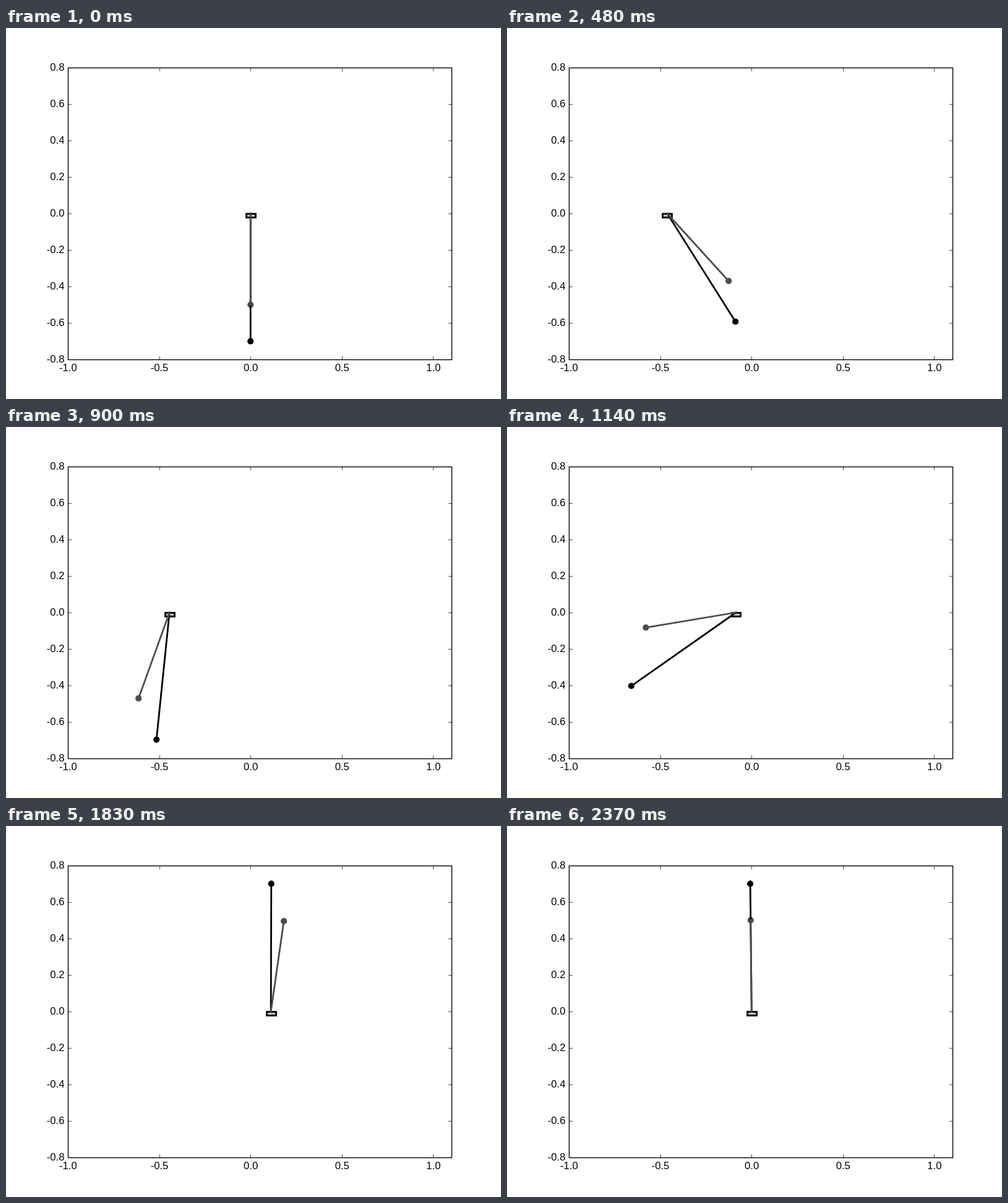
An HTML page with a canvas for the animation above (2400 ms loop, 800 px wide and 600 px high).

```html
<!DOCTYPE html>
<html lang="en">
<head>
<meta charset="utf-8">
<title>Two pendulums on a cart</title>
<style>
  html, body { margin: 0; width: 100%; height: 100%; overflow: hidden; background: #fff; }
  canvas { display: block; }
</style>
</head>
<body>
<canvas id="stage" width="800" height="600"></canvas>
<script>
const FRAMES = 80, FRAME_MS = 30;
const STEP = 2 / FRAMES;          // simulated seconds per frame
const GRAVITY = 9.81;
const LENGTHS = [0.7, 0.5];

// Key poses: frame, cart position, angle of each rod (0 = hanging), weight.
const KEYS = [
  [-1, 0, 0, 0, 1],
  [0, 0, 0, 0, 3],
  [16, -0.463, 0.561, 0.738, 1],
  [18, -0.517, 0.585, null, 0.5],
  [30, -0.443, -0.104, -0.345, 1],
  [36, -0.208, -0.733, null, 0.4],
  [38, -0.084, -0.958, -1.408, 1],
  [49, 0.858, -1.926, -2.033, 1],
  [54, 0.763, -2.339, null, 0.5],
  [61, 0.1115, -3.1455, -3.283, 1],
  [72, -0.06, null, null, 0.3],
  [79, 0, -3.131, -3.131, 1],
  [80, 0, -3.131, -3.131, 0.7]
];
// Turning points of the cart: frame range, position, direction.
const TURNS = [[46, 54, 0.8815, 1], [61, 72, -0.182, -1]];

const SIZE = 3 * (FRAMES + 2), BAND = 12;
const at = (frame, part) => 3 * (frame + 1) + part;

// Builds the banded least-squares system for motion x.
function assemble(x, physics, turns) {
  const A = Array.from({ length: SIZE }, () => new Float64Array(BAND + 1));
  const g = new Float64Array(SIZE);
  let cost = 0;

  function add(weight, r, terms) {
    cost += (weight * r) ** 2;
    const w2 = weight * weight;
    for (const [i, a] of terms) {
      g[i] += w2 * a * r;
      for (const [j, b] of terms) if (j <= i) A[i][i - j] += w2 * a * b;
    }
  }

  for (const [frame, ...rest] of KEYS) {
    for (let part = 0; part < 3; part++) {
      if (rest[part] === null) continue;
      const i = at(frame, part);
      add((part ? 350 : 600) * rest[3], x[i] - rest[part], [[i, 1]]);
    }
  }
  for (const [i, value] of turns) add(300, x[i] - value, [[i, 1]]);

  // Smooth acceleration.
  for (let f = 1; f < FRAMES - 1; f++) {
    for (let part = 0; part < 3; part++) {
      const terms = [1, -4, 6, -4, 1].map((k, n) => [at(f + n - 2, part), k]);
      const r = terms.reduce((sum, [i, k]) => sum + k * x[i], 0);
      add((part ? 0.1 : 0.4) / STEP ** 2, r, terms);
    }
  }

  // Rod driven by the cart: L * angle'' + g sin(angle) + cart'' cos(angle) = 0.
  if (physics) {
    const k = 1 / STEP ** 2;
    const second = (f, part) => k * (x[at(f + 1, part)] - 2 * x[at(f, part)] + x[at(f - 1, part)]);
    for (let f = 0; f < FRAMES; f++) {
      const push = second(f, 0);
      LENGTHS.forEach((len, n) => {
        const part = n + 1, angle = x[at(f, part)];
        const s = Math.sin(angle), c = Math.cos(angle);
        add(physics, len * second(f, part) + GRAVITY * s + push * c, [
          [at(f - 1, part), len * k],
          [at(f, part), -2 * len * k + GRAVITY * c - push * s],
          [at(f + 1, part), len * k],
          [at(f - 1, 0), c * k],
          [at(f, 0), -2 * c * k],
          [at(f + 1, 0), c * k]
        ]);
      });
    }
  }
  return { A, g, cost };
}

// Banded Cholesky solve of (A + damping * diag A) d = -g.
function solve({ A, g }, damping) {
  const low = A.map(row => new Float64Array(row.length));
  const d = new Float64Array(SIZE);
  for (let i = 0; i < SIZE; i++) {
    const first = Math.max(0, i - BAND);
    for (let j = first; j <= i; j++) {
      let s = A[i][i - j] * (i === j ? 1 + damping : 1);
      for (let k = first; k < j; k++) s -= low[i][i - k] * low[j][j - k];
      low[i][i - j] = i === j ? Math.sqrt(s) : s / low[j][0];
    }
    let s = -g[i];
    for (let k = first; k < i; k++) s -= low[i][i - k] * d[k];
    d[i] = s / low[i][0];
  }
  for (let i = SIZE - 1; i >= 0; i--) {
    for (let k = i + 1; k <= Math.min(SIZE - 1, i + BAND); k++) d[i] -= low[k][k - i] * d[k];
    d[i] /= low[i][0];
  }
  return d;
}

function turnFrames(x) {
  return TURNS.map(([from, to, value, sign]) => {
    let best = from;
    for (let f = from; f <= to; f++) {
      if (sign * x[at(f, 0)] > sign * x[at(best, 0)]) best = f;
    }
    return [at(best, 0), value];
  });
}

// Starts from a smooth curve through the keys, then tightens the physics.
function planMotion() {
  let x = new Float64Array(SIZE);
  x = solve(assemble(x, 0, []), 0);
  for (const physics of [0, 0.03, 0.1, 0.3, 1, 3, 10, 10]) {
    const turns = turnFrames(x);
    let system = assemble(x, physics, turns), damping = 1e-3;
    for (let n = 0; n < 25; n++) {
      const d = solve(system, damping);
      const next = x.map((v, i) => v + d[i]);
      const trial = assemble(next, physics, turns);
      if (trial.cost < system.cost) {
        const done = system.cost - trial.cost < 1e-6 * system.cost;
        x = next;
        system = trial;
        damping *= 0.2;
        if (done) break;
      } else {
        damping *= 6;
      }
    }
  }
  return x;
}

const ctx = document.getElementById("stage").getContext("2d");
const SCALE = 620 / 2.1;
const toX = x => 100 + (x + 1) * SCALE;
const toY = y => 300 - y * SCALE;
const snap = v => Math.floor(v + 0.5) + 0.5;
const LEFT = 100.5, RIGHT = 720.5, TOP = 64.5, BOTTOM = 536.5;

function line(x1, y1, x2, y2) {
  ctx.beginPath();
  ctx.moveTo(x1, y1);
  ctx.lineTo(x2, y2);
  ctx.stroke();
}

function drawAxes() {
  const tick = 5.56;
  ctx.strokeStyle = ctx.fillStyle = "#000";
  ctx.lineCap = "butt";
  ctx.lineWidth = 0.7;
  ctx.font = '16.67px "Liberation Sans", Arial, sans-serif';
  ctx.textBaseline = "alphabetic";
  ctx.textAlign = "center";
  for (let n = -2; n <= 2; n++) {
    const x = snap(toX(n / 2));
    line(x, BOTTOM, x, BOTTOM - tick);
    line(x, TOP, x, TOP + tick);
    ctx.fillText((n / 2).toFixed(1), toX(n / 2) + 0.4, 554.5);
  }
  ctx.textAlign = "right";
  for (let n = -4; n <= 4; n++) {
    const y = snap(toY(n / 5));
    line(LEFT, y, LEFT + tick, y);
    line(RIGHT, y, RIGHT - tick, y);
    ctx.fillText((n / 5).toFixed(1), 94.4, Math.round(toY(n / 5)) + 5);
  }
  ctx.lineWidth = 1.39;
  ctx.strokeRect(LEFT, TOP, RIGHT - LEFT, BOTTOM - TOP);
}

function drawPendulums(cart, angles) {
  const left = snap(toX(cart - 0.025)), right = snap(toX(cart + 0.025));
  const top = snap(toY(0)), bottom = snap(toY(-0.02));
  ctx.lineWidth = 2.78;
  ctx.strokeStyle = "#000";
  ctx.fillStyle = "#c0c0c0";
  ctx.fillRect(left, top, right - left, bottom - top);
  ctx.strokeRect(left, top, right - left, bottom - top);

  const rods = LENGTHS.map((len, n) => ({
    x: toX(cart + len * Math.sin(angles[n])),
    y: toY(-len * Math.cos(angles[n])),
    color: n ? "#4d4d4d" : "#000"
  }));
  for (const { x, y, color } of rods) {
    ctx.fillStyle = color;
    ctx.beginPath();
    ctx.arc(x, y, 5.1, 0, 2 * Math.PI);
    ctx.fill();
  }
  ctx.lineCap = "square";
  for (const { x, y, color } of rods) {
    ctx.strokeStyle = color;
    line(toX(cart), toY(0), x, y);
  }
}

const motion = planMotion();

function render(now) {
  const frame = Math.floor(Math.max(0, now) / FRAME_MS) % FRAMES;
  const [cart, ...angles] = motion.subarray(at(frame, 0), at(frame, 3));
  ctx.fillStyle = "#fff";
  ctx.fillRect(0, 0, 800, 600);
  drawPendulums(cart, angles);
  drawAxes();
}

function loop(now) {
  render(now);
  requestAnimationFrame(loop);
}
render(0);
requestAnimationFrame(loop);
</script>
</body>
</html>
```
